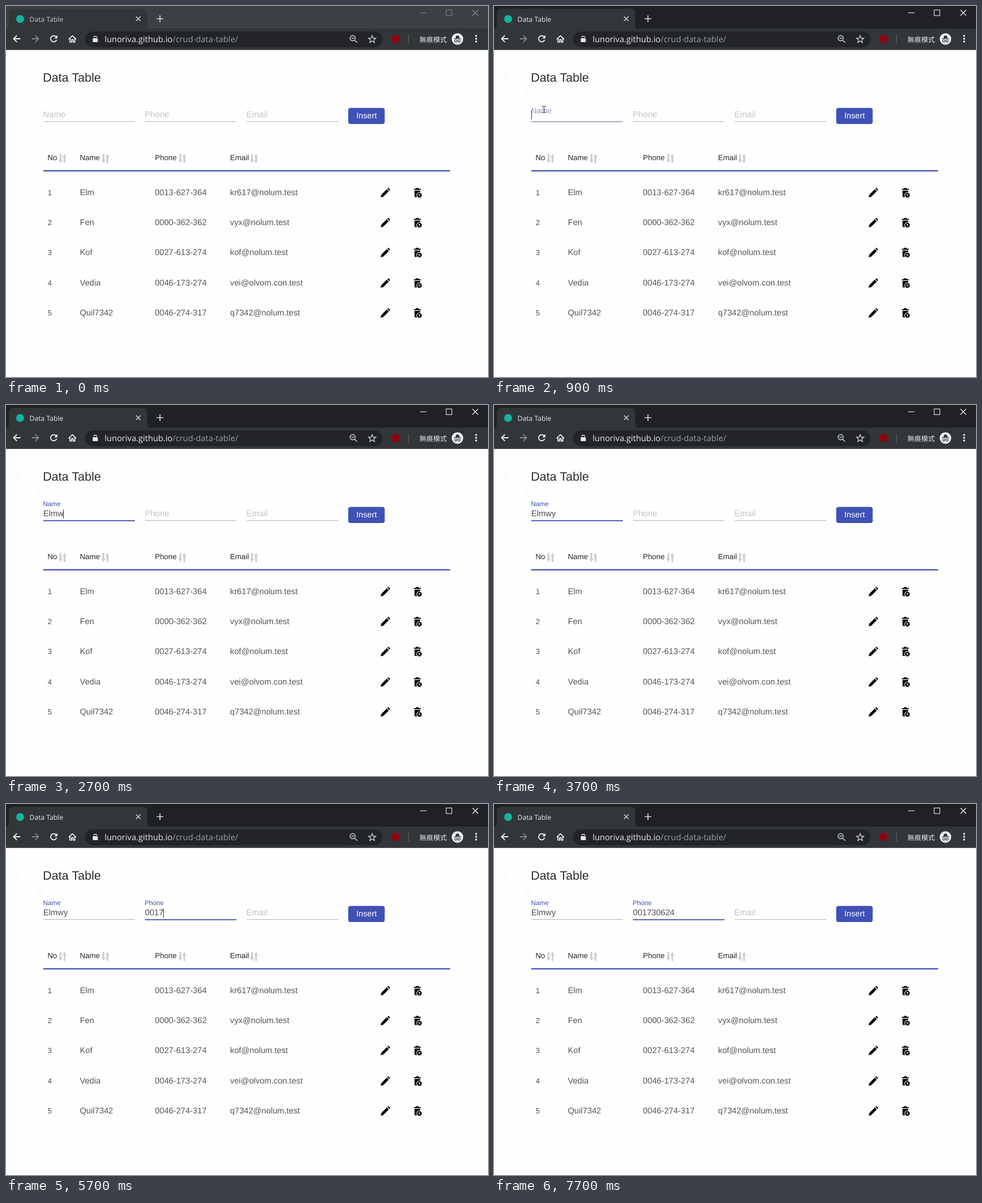
Animation of 853 by 657 pixels, one loop 8000 ms. Source, as an HTML page with a canvas:

```html
<!DOCTYPE html>
<html lang="en">
<head>
<meta charset="utf-8">
<title>Data Table</title>
<style>
html, body { margin: 0; width: 100%; height: 100%; overflow: hidden; background: #fefefe; }
canvas { display: block; }
</style>
</head>
<body>
<canvas id="stage" width="853" height="657"></canvas>
<script>
const ctx = document.getElementById('stage').getContext('2d');
const LOOP = 8000, TICK = 100;
const SANS = '"Liberation Sans", Arial, sans-serif';
const UI = '"Open Sans", "Noto Sans", sans-serif';
const CJK = '"Noto Sans CJK TC", "Noto Sans CJK", "Noto Sans CJK JP", sans-serif';
const BLUE = [63, 81, 181], GREY = [196, 196, 196];

const rows = [
  ['Elm', '0013-627-364', 'kr617@nolum.test'],
  ['Fen', '0000-362-362', 'vyx@nolum.test'],
  ['Kof', '0027-613-274', 'kof@nolum.test'],
  ['Vedia', '0046-173-274', 'vei@olvom.con.test'],
  ['Quil7342', '0046-274-317', 'q7342@nolum.test']
];
const columns = [['No', 73.5, 93], ['Name', 130.7, 169], ['Phone', 263.6, 305], ['Email', 396.6, 432]];

const fields = [
  {
    x: 66, label: 'Name', focus: 860, blur: 4000, text: 'Elmwy',
    keys: [1700, 2000, 2200, 2700, 3200],
    caret: [[900, 1300], [1700, 3700]],
    error: ['Name already exists', 2200, 2700]
  },
  {
    x: 246, label: 'Phone', focus: 4040, blur: Infinity, text: '001730624',
    keys: [5000, 5200, 5400, 5700, 6000, 6100, 6300, 6500, 6600],
    caret: [[4000, 4500], [5000, 7100], [7200, 7700]],
    error: ['Phone must be number', 7200, 7600]
  },
  { x: 426, label: 'Email', focus: Infinity, blur: Infinity, text: '', keys: [], caret: [] }
];

const pointerPath = [[108, 1], [50, 32], [13, 76], [18, 117], [57, 147]];

const tab = new Path2D('M0 40Q5 40 5 35V13Q5 5 13 5H242Q250 5 250 13V35Q250 40 255 40z');
const pencil = new Path2D('M0 17L1.2 12.3 11 2.5 14.5 6 4.7 15.8zM11.9 1.6L13 .5Q13.6 0 14.2 .5L16.5 2.8Q17 3.4 16.5 4L15.4 5.1z');
const sortArrows = new Path2D('M2 0h3v10h2.2L3.5 16 0 10h2zM9 16V6H7L10.5 0 14 6h-2v10z');
const trash = new Path2D('M0 1.8h3.5V.2h4.8v1.6H12v2H0zM1 5h10V16.5H2.4Q1 16.5 1 15z');
const arrow = new Path2D('M.5 .5V13.5L3.5 10.6 5.6 15.4 7.7 14.4 5.7 9.9H9.8z');
const star = new Path2D('M0-6.4L1.8-2 6.5-1.7 2.9 1.3 4 6 0 3.4-4 6-2.9 1.3-6.5-1.7-1.8-2z');
const home = new Path2D('M-6.5 .3L0-5.8 6.5 .3M-4.3-1V5.5H-1.4V1.2H1.4V5.5H4.3V-1');
const backArrow = new Path2D('M6.5 0H-5.5M.3-5.9L-5.6 0 .3 5.9');
const reloadHead = new Path2D('M6.5-6.5V-.8H.8z');
const hat = new Path2D('M-3.6-1.6L-2.5-6H2.5L3.6-1.6z');

const mix = (a, b, p) => a + (b - a) * p;
const mixColor = (a, b, p) => `rgb(${a.map((v, i) => Math.round(mix(v, b[i], p))).join(',')})`;
const easeOut = p => 1 - (1 - p) ** 2;
const progress = (t, start, span) => easeOut(Math.min(1, Math.max(0, (t - start) / span)));
const during = (t, [start, end]) => t >= start && t < end;

function text(str, x, y, size, color, family = SANS) {
  ctx.font = `${size}px ${family}`;
  ctx.fillStyle = color;
  ctx.fillText(str, x, y);
  return ctx.measureText(str).width;
}

function rect(x, y, w, h, color, radius = 0) {
  ctx.fillStyle = color;
  ctx.beginPath();
  ctx.roundRect(x, y, w, h, radius);
  ctx.fill();
}

function dot(x, y, r, color) {
  ctx.fillStyle = color;
  ctx.beginPath();
  ctx.arc(x, y, r, 0, Math.PI * 2);
  ctx.fill();
}

function ring(x, y, r, color, width, from = 0, to = Math.PI * 2) {
  ctx.strokeStyle = color;
  ctx.lineWidth = width;
  ctx.beginPath();
  ctx.arc(x, y, r, from, to);
  ctx.stroke();
}

function lines(color, width, ...segments) {
  ctx.strokeStyle = color;
  ctx.lineWidth = width;
  ctx.beginPath();
  for (const [x1, y1, x2, y2] of segments) {
    ctx.moveTo(x1, y1);
    ctx.lineTo(x2, y2);
  }
  ctx.stroke();
}

const cross = (x, y, r, color, width) =>
  lines(color, width, [x - r, y - r, x + r, y + r], [x - r, y + r, x + r, y - r]);

function shape(path, x, y, { fill, stroke, width = 1, flip = 1 }) {
  ctx.save();
  ctx.translate(x, y);
  ctx.scale(flip, 1);
  if (fill) {
    ctx.fillStyle = fill;
    ctx.fill(path);
  }
  if (stroke) {
    ctx.strokeStyle = stroke;
    ctx.lineWidth = width;
    ctx.stroke(path);
  }
  ctx.restore();
}

function drawTitleBar(active) {
  const control = active ? '#fff' : '#85888b';
  rect(0, 0, 853, 40, active ? '#202124' : '#3c4043');
  shape(tab, 0, 0, { fill: '#323639' });
  dot(25, 23, 7, '#12b5a0');
  text('Data Table', 41.5, 27.5, 12.2, active ? '#e8eaed' : '#c0c3c6', UI);
  cross(234, 22.5, 4, '#d5d8db', 1.5);
  lines('#d5d8db', 1.7, [266.5, 22.5, 278.5, 22.5], [272.5, 16.5, 272.5, 28.5]);
  lines(control, 1, [733, 12, 744, 12]);
  ctx.strokeRect(779, 7, 10, 10);
  cross(830.5, 12, 5, control, 1.1);
}

function drawToolbar() {
  const bright = '#f1f3f4', light = '#e8eaed', soft = '#c6c9cc', dark = '#323639';
  rect(0, 40, 853, 38, dark);
  rect(0, 77, 853, 1, '#56595c');
  shape(backArrow, 19, 58, { stroke: bright, width: 1.8 });
  shape(backArrow, 52, 58, { stroke: '#85888b', width: 1.8, flip: -1 });
  ring(84.5, 58, 5.4, bright, 1.8, 0.35, 5.5);
  shape(reloadHead, 84.5, 58, { fill: bright });
  shape(home, 117.5, 58.5, { stroke: bright, width: 1.7 });

  rect(140, 45, 526, 28, '#222427', 14);
  rect(153.5, 57, 9, 7, light, 1);
  ring(158, 56, 2.6, light, 1.3, Math.PI, 0);
  const host = text('lunoriva.github.io', 174.5, 63.5, 14.7, light, UI);
  text('/crud-data-table/', 174.5 + host, 63.5, 14.7, '#9aa0a6', UI);
  ring(613.5, 57, 4.6, soft, 1.6);
  lines(soft, 1.6, [617, 60.5, 621.5, 65], [611, 57, 616, 57]);
  shape(star, 648, 58.8, { stroke: soft, width: 1.4 });

  dot(689, 58.5, 7.5, '#8c0610');
  lines('#5f6368', 1, [712.5, 51, 712.5, 67]);
  text('無痕模式', 731.5, 63.5, 12.2, light, CJK);
  dot(799, 58.5, 10.2, bright);
  shape(hat, 799, 58.5, { fill: dark });
  lines(dark, 1.2, [792.5, 57.8, 805.5, 57.8], [798, 61.5, 800, 61.5]);
  ring(796, 62, 2, dark, 1.1);
  ring(802, 62, 2, dark, 1.1);
  for (const y of [53, 58, 63]) dot(832, y, 1.7, bright);
}

function drawField(field, t) {
  const { x, label, keys, error } = field;
  const p = progress(t, field.focus, 200);
  const typed = field.text.slice(0, keys.filter(k => k <= t).length);

  rect(x, 204, 162, 1.3, '#bdbdbd');
  if (t < field.blur) {
    ctx.globalAlpha = p;
    rect(x, 204, 162, 1.7, '#3f51b5');
    ctx.globalAlpha = 1;
  }
  text(label, x - 0.5, mix(197, 178.5, p), mix(15, 11.7, p), mixColor(GREY, BLUE, p));
  const width = text(typed, x, 197, 14.7, '#495057');
  if (field.caret.some(span => during(t, span))) {
    rect(Math.floor(x + width), 185, 1, 16, '#333');
  }
  if (error && during(t, error.slice(1))) text(error[0], x, 216, 11.7, '#f44336');
}

function drawDelete(x, y) {
  shape(trash, x, y, { fill: '#000' });
  dot(x + 9.6, y + 13, 5.3, '#fefefe');
  dot(x + 9.6, y + 13, 4.2, '#000');
  cross(x + 9.6, y + 13, 1.6, '#fefefe', 1.1);
}

function drawTable() {
  for (const [name, x, iconX] of columns) {
    text(name, x, 273, 13.3, '#212529');
    shape(sortArrows, iconX, 262, { fill: '#cdcdcd' });
  }
  rect(66, 290.7, 720, 2.4, '#3f51b5');
  rows.forEach((row, i) => {
    const y = Math.round(335 + i * 53.2);
    text(i + 1, 73.8, y, 13.2, '#495057');
    row.forEach((cell, c) => text(cell, columns[c + 1][1], y, 14.7, '#54565b'));
    shape(pencil, 663, y - 13, { fill: '#000' });
    drawDelete(722, y - 13);
  });
}

function drawPointer(t) {
  const step = Math.floor(t / TICK) - 1;
  // Faint trails stay where the pointer passed.
  pointerPath.forEach(([x, y], i) => {
    if (i > 2 && step > i) shape(arrow, x, y, { stroke: '#f7f7f7' });
  });
  if (pointerPath[step]) {
    shape(arrow, ...pointerPath[step], { fill: '#fff', stroke: '#000' });
  } else if (during(t, [600, 1000])) {
    lines('#222', 1, [88.5, 178, 88.5, 188],
      [85, 177.5, 88, 177.5], [89, 177.5, 92, 177.5],
      [85, 188.5, 88, 188.5], [89, 188.5, 92, 188.5]);
  }
}

function draw(t) {
  rect(0, 0, 853, 657, '#fefefe');
  drawTitleBar(t >= 900);
  drawToolbar();
  text('Data Table', 65.2, 134.3, 21.6, '#2b2e32');
  fields.forEach(field => drawField(field, t));
  rect(605.6, 180.6, 64.6, 28.3, '#3f51b5', 4);
  text('Insert', 620, 199, 14.5, '#fff');
  drawTable();
  drawPointer(t);
}

const start = performance.now();
function frame() {
  const t = (performance.now() - start) % LOOP;
  // The screen is refreshed ten times a second.
  draw(Math.floor(t / TICK) * TICK);
  requestAnimationFrame(frame);
}
ctx.textRendering = 'geometricPrecision';
frame();
</script>
</body>
</html>
```
